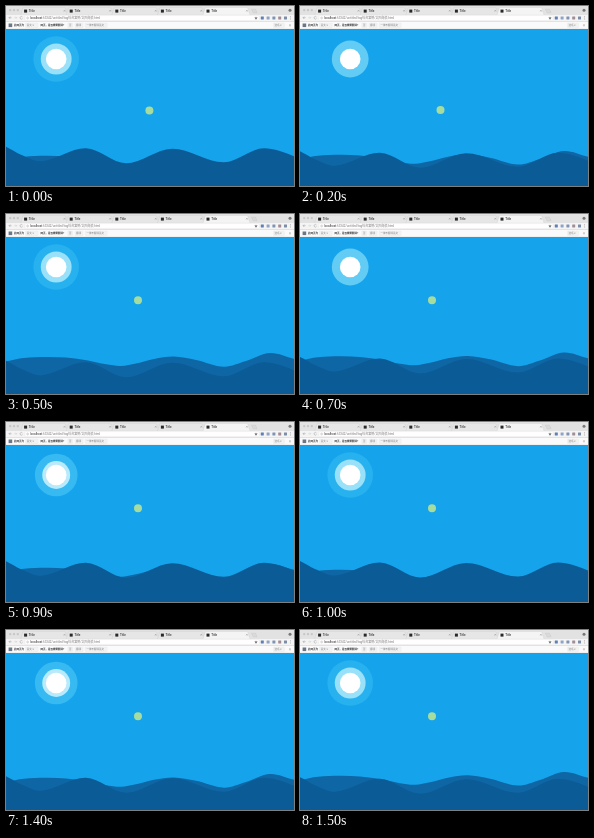
Write an HTML page that moves like this. It is 288 by 180 pixels and loops after 1.6 s.

```html
<!DOCTYPE html>
<html lang="zh">
<head>
<meta charset="utf-8">
<title>Sun and waves</title>
<style>
html, body { margin: 0; width: 100%; height: 100%; overflow: hidden; background: #15a3ec; }
svg { display: block; width: 100vw; height: 100vh; }
text { font-family: Roboto, "Noto Sans CJK SC", "Noto Sans CJK", sans-serif; }
</style>
</head>
<body>
<svg id="stage" viewBox="0 0 288 180" xmlns="http://www.w3.org/2000/svg">
  <rect width="288" height="180" fill="#15a3ec"/>
  <g id="rings"></g>
  <circle cx="50.2" cy="53" r="10.3" fill="#fff"/>
  <path id="back" fill="#0e66a4"/>
  <path id="front" fill="#0b5b96"/>
  <circle id="ball" r="4" fill="#a6dd9e"/>
  <g id="chrome"></g>
</svg>
<script>
const LOOP = 1600, STEP = 100, PULSE = 500, SWELL = 1150;
const NS = "http://www.w3.org/2000/svg";
const $ = id => document.getElementById(id);

function add(parent, tag, attrs, text) {
  const el = document.createElementNS(NS, tag);
  for (const k in attrs) el.setAttribute(k, attrs[k]);
  if (text) el.textContent = text;
  parent.appendChild(el);
  return el;
}

function drawChrome() {
  const g = $("chrome");
  const box = (x, y, width, height, fill, more) =>
    add(g, "rect", { x, y, width, height, fill, ...more });
  const label = (x, y, size, fill, text, more) =>
    add(g, "text", { x, y, "font-size": size, fill, ...more }, text);
  const line = (d, stroke, w = 0.5) =>
    add(g, "path", { d, stroke, "stroke-width": w, fill: "none" });
  const cross = (x, y, s, c) =>
    line(`M${x - s} ${y - s}l${2 * s} ${2 * s}M${x + s} ${y - s}l${-2 * s} ${2 * s}`, c, 0.45);

  // Tab strip
  box(0, 0, 288, 9, "#e2e2e2");
  for (let i = 0; i < 3; i++)
    add(g, "circle", { cx: 4.2 + i * 3.8, cy: 4.2, r: 1.15, fill: "#c6c6c6" });
  for (let i = 0; i < 5; i++) {
    const x = 15.5 + i * 45.6, on = i === 4;
    add(g, "path", {
      d: `M${x - 1} 9.2L${x + 1.6} 1.4H${x + 43.6}L${x + 46.2} 9.2Z`,
      fill: on ? "#f4f4f4" : "#e6e6e6", stroke: "#c8c8c8", "stroke-width": 0.3
    });
    box(x + 2.6, 3.6, 3, 3, "#292929");
    label(x + 7.3, 6.1, 3, "#333", "Title", { "font-weight": 500 });
    cross(x + 43, 4.8, 0.75, "#888");
  }
  add(g, "path", { d: "M245.5 3.2h4l1.6 3.6h-4z", fill: "#dadada", stroke: "#bbb", "stroke-width": 0.3 });
  add(g, "circle", { cx: 284, cy: 4.2, r: 1.5, fill: "#777" });

  // Address bar
  box(0, 9, 288, 6.8, "#f4f4f4");
  line("M5.6 11.7H3M4.2 10.5L3 11.7l1.2 1.2", "#999");
  line("M8.2 11.7h2.6M9.6 10.5l1.2 1.2-1.2 1.2", "#ccc");
  line("M16.4 11a1.3 1.3 0 1 0 .1 1.4", "#999");
  box(19, 9.6, 234, 4.8, "#fff", { rx: 0.7, stroke: "#ddd", "stroke-width": 0.3 });
  add(g, "circle", { cx: 21.6, cy: 12, r: 0.9, fill: "none", stroke: "#888", "stroke-width": 0.35 });
  const url = label(24, 13, 3, "#777", "");
  add(url, "tspan", { fill: "#222" }, "localhost");
  add(url, "tspan", {}, ":63342/untitled/tag综合案例/太阳海浪.html");
  add(g, "path", {
    d: "M250 10.4l.5 1.1 1.2.1-.9.8.3 1.2-1.1-.6-1.1.6.3-1.2-.9-.8 1.2-.1z",
    fill: "#777"
  });
  ["#5d7fb4", "#8fa3c4", "#7f93b5", "#a08e94", "#7c8da8"].forEach((c, i) =>
    box(254.8 + i * 5.8, 10.4, 3, 3, c, { rx: 0.3 }));
  for (let i = 0; i < 3; i++)
    add(g, "circle", { cx: 284.6, cy: 10.7 + i * 1.2, r: 0.38, fill: "#777" });

  // Translate bar
  box(0, 15.8, 288, 7.2, "#fafafa");
  box(0, 15.6, 288, 0.3, "#dcdcdc");
  box(0, 22.7, 288, 0.3, "#d8d8d8");
  box(2.6, 17.5, 3.6, 3.6, "#6c7684");
  const button = (x, w, text) => {
    box(x, 17, w, 4.6, "#f2f2f2", { rx: 0.6, stroke: "#dedede", "stroke-width": 0.25 });
    label(x + 1.2, 20.3, 2.5, "#777", text);
  };
  const bold = { "font-weight": 700 };
  label(8, 20.4, 2.5, "#333", "此网页为", bold);
  button(19.6, 12.6, "英文 ▾");
  label(34.4, 20.4, 2.5, "#333", "网页，是否需要翻译？", bold);
  button(61.8, 5, "否");
  button(69, 8, "翻译");
  button(79.2, 22, "一律不翻译英文");
  button(267.4, 11, "选项 ▾");
  cross(284, 19.3, 0.8, "#777");
}

// Smooth curve through [x, y] points, closed along the bottom
function wave(pts, dy) {
  let d = `M${pts[0][0]} ${pts[0][1] + dy}`;
  for (let i = 0; i < pts.length - 1; i++) {
    const p = pts[Math.max(i - 1, 0)], a = pts[i], b = pts[i + 1];
    const n = pts[Math.min(i + 2, pts.length - 1)];
    const ka = (b[1] - p[1]) / (b[0] - p[0]), kb = (n[1] - a[1]) / (n[0] - a[0]);
    const h = (b[0] - a[0]) / 3;
    d += `C${a[0] + h} ${a[1] + ka * h + dy} ${b[0] - h} ${b[1] - kb * h + dy} ${b[0]} ${b[1] + dy}`;
  }
  return d + "V190H-20Z";
}

const backPts = [
  [-14, 9], [0, 4.5], [18, 1], [40, 0], [60, 0.7], [82, 3.6], [100, 7.4], [115, 9],
  [130, 6.5], [148, 2], [168, -0.4], [190, 3], [218, 9.8], [240, 4.2], [264, -3.8], [288, 2], [306, 6]
];
const frontPts = [
  [-14, -6], [0, -1.5], [15, 6.5], [36, 13], [80, 0], [120, 15], [166, 0.5], [218, 14], [258, 0], [304, 14]
];

const swell = (t, mid, amp, peak) =>
  mid + amp * Math.cos((t - peak) / SWELL * 2 * Math.PI);

const ringEls = [0, 1].map(() => add($("rings"), "circle", { cx: 50.2, cy: 53 }));

function ring(el, age) {
  const left = 1 - age / (2 * PULSE);
  const mix = (from, pow) => Math.round(from + (255 - from) * left ** pow);
  el.setAttribute("r", 11 + age * 0.0148);
  el.setAttribute("fill", `rgb(${mix(21, 1.6)},${mix(163, 1.15)},${mix(236, 1.15)})`);
  el.setAttribute("visibility", age < PULSE / 5 ? "hidden" : "visible");
}

// Pointer path: time, x, y
const track = [[0, 143.4, 104.6], [200, 140.5, 104], [300, 135.3, 94], [400, 132, 86.2], [LOOP, 132, 86.2]];
function ballAt(t) {
  const i = track.findIndex(k => k[0] > t), a = track[i - 1], b = track[i];
  const u = (t - a[0]) / (b[0] - a[0]);
  return [a[1] + (b[1] - a[1]) * u, a[2] + (b[2] - a[2]) * u];
}

function draw(t) {
  const age = (t + 300) % PULSE;
  ring(ringEls[0], age + PULSE);
  ring(ringEls[1], age);
  $("back").setAttribute("d", wave(backPts, swell(t, 146, 4, 50)));
  $("front").setAttribute("d", wave(frontPts, swell(t, 144.7, 4.3, 400)));
  const [x, y] = ballAt(t);
  $("ball").setAttribute("cx", x);
  $("ball").setAttribute("cy", y);
}

drawChrome();
const start = performance.now();
function tick() {
  const t = (performance.now() - start) % LOOP;
  draw(Math.floor(t / STEP) * STEP);
  requestAnimationFrame(tick);
}
tick();
</script>
</body>
</html>
```
